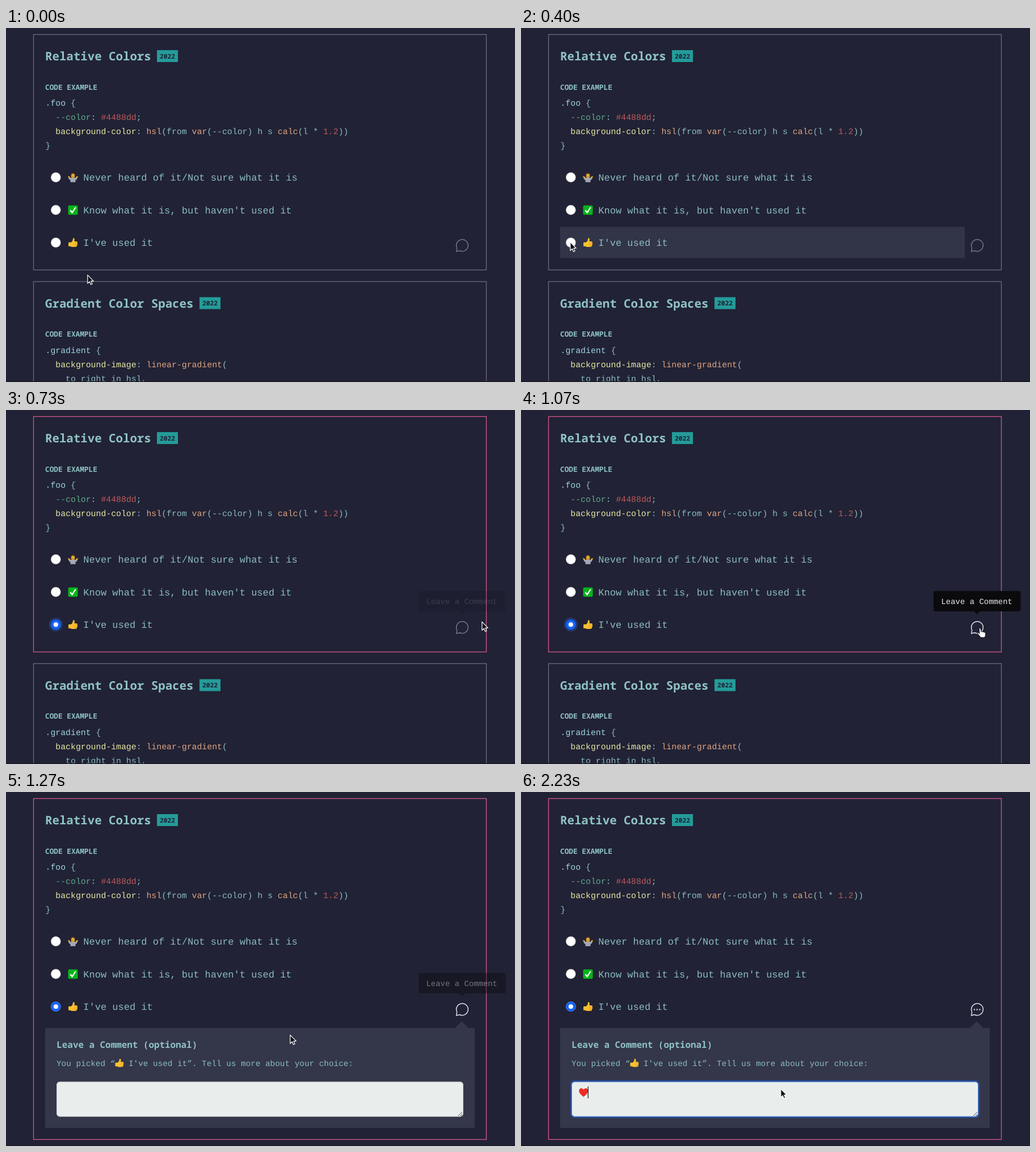
These frames come from a looping animation (897 px wide and 624 px high, 2330 ms). An HTML page:

```html
<!DOCTYPE html>
<html lang="en">
<head>
<meta charset="utf-8">
<title>Survey comment</title>
<style>
  html, body { margin: 0; width: 100%; height: 100%; overflow: hidden; background: #212235; }
  svg { display: block; width: 897px; height: 624px; }
  text { font-family: "Liberation Mono", "Noto Sans Mono", monospace; fill: #8bbcc0; white-space: pre; text-rendering: geometricPrecision; }
  .bold { font-family: "Noto Sans Mono", "Liberation Mono", monospace; font-weight: 600; fill: #8fc3c4; }
  .dark { fill: #1f2134; font-weight: 700; }
  .sel { fill: #9fd3e4; }
  .prop { fill: #e6e8a4; }
  .var { fill: #5fa98a; }
  .num { fill: #bd5a5c; }
  .fn { fill: #e0a580; }
  .card { fill: none; stroke: #6b6c7b; stroke-width: 1.3; }
  .card.on { stroke: #d4578f; }
  .icon { fill: none; stroke: #73758a; stroke-width: 1.5; stroke-linejoin: round; }
  .icon.on { stroke: #dfe2e9; }
</style>
</head>
<body>
<svg id="stage" viewBox="0 0 897 624">
  <defs>
    <g id="shrug">
      <path d="M1 8.5L4 9.6 5.5 9H12.500L14 9.600 17 8.500 15.600 12.500 13.500 13V17H4.500V13L2.400 12.500Z" fill="#a3a9b6"/>
      <path d="M0 6.300L3.500 7.200 4 9.400 1.200 9.800ZM18 6.300L14.500 7.200 14 9.400 16.800 9.800Z" fill="#e9b02f"/>
      <path d="M4.800 8.500V4.500Q5 0.500 9 0.500T13.200 4.500V8.500Z" fill="#5b3d25"/>
      <ellipse cx="9" cy="6" rx="3" ry="3.700" fill="#eab53a"/>
      <path d="M7.200 5.500H8M10 5.500H10.800M7.800 8H10.200" stroke="#6a431f" stroke-width=".8"/>
    </g>
    <g id="check">
      <rect x=".5" y=".5" width="17" height="16.500" rx="2" fill="#08b31b"/>
      <path d="M4.300 9L7.600 13.200 13.700 3.800" fill="none" stroke="#fff" stroke-width="2.200"/>
    </g>
    <g id="thumb">
      <path d="M1 9Q1 8 3 8L6 8Q9 5 9 2 9 0 10.800.8 12.600 2 11.400 6.400L15.600 6.600Q17.400 7 16.600 8.800 17.800 10 16.600 11.200 17.400 12.600 16 13.600 16.400 15.600 14.400 16L9 16.400Q6 16.400 4 15L1 15Z" fill="#fbc02f"/>
      <path d="M11 9H16M11 11.400H16.200M11 13.700H15.800" stroke="#dd951f" stroke-width=".7"/>
    </g>
    <path id="arrow" d="M.8.3V15.300L4.200 12.100 6.500 17.300 9 16.200 6.800 11.100H11.300Z" fill="#111219" stroke="#fff" stroke-width="1.200" stroke-linejoin="round"/>
    <path id="hand" d="M-1.700 1Q-1.700-.5-.3-.5T1.200 1L2 6Q3.600 4.700 4.700 6.200 6.300 5.300 7.200 6.900 9.500 6.300 9.700 8.500 9.900 12.500 8.300 16H1.200Q-1 13-4.200 9.300-4.500 7.300-2.500 7.800L-.7 9.200Z" fill="#fff" stroke="#15161f" stroke-width="1" stroke-linejoin="round"/>
  </defs>
</svg>
<script>
const LOOP = 2330, TICK = 100 / 3;
const stage = document.getElementById("stage");
const $ = id => document.getElementById(id);

const text = (x, y, size, body, cls = "") =>
  `<text x="${x}" y="${y}" font-size="${size}" class="${cls}">${body}</text>`;
const rect = (x, y, w, h, attrs) =>
  `<rect x="${x}" y="${y}" width="${w}" height="${h}" ${attrs}/>`;
const use = (id, x, y, scale = 1) =>
  `<use href="#${id}" transform="translate(${x} ${y}) scale(${scale})"/>`;
// Tokens look like "class|text"; without a class the base colour is used.
const code = (x, y, ...tokens) => text(x, y, 14.84, tokens.map(t => {
  const [cls, s] = t.includes("|") ? t.split("|") : ["", t];
  return `<tspan class="${cls}">${s}</tspan>`;
}).join(""));

const heading = (y, title, badgeX) =>
  text(69, y + 45.5, 20.75, title, "bold") +
  rect(badgeX, y + 27.5, 37, 21, 'fill="#249b99"') +
  text(badgeX + 5, y + 42, 11.2, "2022", "bold dark") +
  text(69, y + 97.2, 12.75, "CODE EXAMPLE", "bold");

const option = (y, emoji, label) =>
  `<circle cx="87.800" cy="${y}" r="8.500" fill="#fff" stroke="#b9bac2" stroke-width=".5"/>` +
  use(emoji, 109, y - 8.5) + text(136.3, y + 6, 17, label);

stage.insertAdjacentHTML("beforeend", `
  ${heading(11.5, "Relative Colors", 266)}
  ${code(69.500, 137, "sel|.foo", " {")}
  ${code(87.300, 162, "var|--color", ": ", "num|#4488dd", ";")}
  ${code(87.300, 187, "prop|background-color", ": ", "fn|hsl", "(from ", "fn|var", "(--color) h s ", "fn|calc", "(l * ", "num|1.2", "))")}
  ${code(69.500, 212, "}")}
  ${rect(69, 350.5, 713, 55, 'id="hover" fill="#323448"')}
  ${option(263.2, "shrug", "Never heard of it/Not sure what it is")}
  ${option(320.7, "check", "Know what it is, but haven't used it")}
  ${option(378.2, "thumb", "I've used it")}
  <g id="picked">
    <circle id="halo" cx="87.800" cy="378.200" r="12" fill="#203b78"/>
    <circle cx="87.800" cy="378.200" r="8.700" fill="#1463fb"/>
    <circle cx="87.800" cy="378.200" r="4" fill="#fff"/>
  </g>
  <g id="next">
    ${rect(48.5, 447, 798, 240, 'class="card"')}
    ${heading(447, "Gradient Color Spaces", 341)}
    ${code(69.500, 572.500, "sel|.gradient", " {")}
    ${code(87.300, 598, "prop|background-image", ": ", "fn|linear-gradient", "(")}
    ${code(105.100, 623, "to right in hsl,")}
  </g>
  ${rect(48.5, 11.5, 798, 415, 'id="card" class="card"')}
  <g id="panel">
    <path d="M69 416H791L803 404 815 416H826V592H69Z" fill="#343649"/>
    ${text(89.300, 451.200, 15.9, "Leave a Comment (optional)", "bold")}
    ${text(89, 483, 14.35, "You picked “")}
    ${use("thumb", 191.5, 469.6, .93)}
    ${text(216, 483, 14.35, "I've used it”. Tell us more about your choice:")}
    <g id="ring">${rect(89.5, 511, 716, 61, 'rx="5" fill="none" stroke="#27488d" stroke-width="6"')}</g>
    ${rect(89.5, 511, 716, 61, 'id="box" rx="5" fill="#e9eeec" stroke="#c4cacb"')}
    <path d="M797 571L804 564M801 571L804 568" stroke="#4a4c55"/>
    <path id="heart" d="M110.300 537.500C106 533.500 102.300 531 102.300 526.500 102.300 521.500 108.500 520.500 110.300 525 112.100 520.500 118.300 521.500 118.300 526.500 118.300 531 114.600 533.500 110.300 537.500Z" fill="#ee2b24"/>
    ${rect(0, 519, 1.2, 21, 'id="caret" fill="#14151d"')}
  </g>
  <g id="bubble" class="icon">
    <path d="M793.600 393.900L794.800 388A10.370 10.370 0 1 1 799.400 392.500Z"/>
    <path id="dots" d="M799 383.500h.01M803.700 383.500h.01M808.400 383.500h.01" stroke-width="2.400" stroke-linecap="round"/>
  </g>
  <g id="tip">
    <path d="M730 319H877.500Q880.500 319 880.500 322V352Q880.500 355 877.500 355H809L803.500 360 798 355H730Q727 355 727 352V322Q727 319 730 319Z" fill="#0b0b0e"/>
    <text x="740.500" y="342" font-size="13.950" style="fill:#e6e7ea">Leave a Comment</text>
  </g>
  ${rect(0, 622.5, 897, 1.5, 'fill="#171827"')}
  <use id="pointer"/>
`);

// Pointer waypoints: tick, x, y. Each hand movement starts fast and settles slowly.
const path = [
  [0, 143, 435], [6, 108, 398], [12, 86, 377], [18, 86, 377],
  [21, 680, 373], [22, 838, 373], [23, 845, 374], [28, 809, 385], [35, 809, 385],
  [38, 500, 428], [41, 463, 495], [46, 457, 523], [70, 457, 523]
];

const slope = (i, axis) =>
  (path[i + 1][axis] - path[i][axis]) / (path[i + 1][0] - path[i][0]);

// Harmonic mean of both sides; the pointer halts where the direction turns.
function tangent(i, axis) {
  if (i === 0 || i === path.length - 1) return 0;
  const a = slope(i - 1, axis), b = slope(i, axis);
  return a * b > 0 ? 2 * a * b / (a + b) : 0;
}

function pointerAt(k) {
  const i = Math.max(1, path.findIndex(p => p[0] >= k)) - 1;
  const span = path[i + 1][0] - path[i][0];
  const u = (k - path[i][0]) / span, v = 1 - u;
  return [1, 2].map(axis =>
    path[i][axis] * v * v * (1 + 2 * u) + path[i + 1][axis] * u * u * (3 - 2 * u) +
    span * u * v * (tangent(i, axis) * v - tangent(i + 1, axis) * u));
}

const ramp = (k, from, to) => Math.min(1, Math.max(0, (k - from) / (to - from)));
const show = (id, on) => $(id).setAttribute("visibility", on ? "inherit" : "hidden");

function draw(k) {
  const [x, y] = pointerAt(k);
  const picked = k >= 13, open = k >= 33, focused = k >= 47, typed = k >= 52;
  const overBubble = x > 791 && x < 816 && y > 372 && y < 397;

  show("hover", x > 69 && x < 782 && y > 350 && y < 405.5);
  show("picked", picked);
  show("halo", !open);
  $("card").classList.toggle("on", picked);
  $("card").setAttribute("height", open ? 601 : 415);
  show("next", !open);
  show("panel", open);
  $("bubble").classList.toggle("on", open || overBubble);
  show("dots", k >= 54);

  $("tip").setAttribute("opacity", ramp(k, 21.2, 27.2) * (1 - ramp(k, 36, 39.4)));

  $("ring").setAttribute("opacity", ramp(k, 46, 48));
  $("box").setAttribute("stroke", focused ? "#6597e6" : "#c4cacb");
  show("heart", typed);
  show("caret", focused && (k < 60 || k >= 67));
  $("caret").setAttribute("x", typed ? 117.7 : 102);

  $("pointer").setAttribute("href", overBubble ? "#hand" : "#arrow");
  $("pointer").setAttribute("transform", `translate(${x} ${y})`);
}

const start = performance.now();
function frame() {
  const t = (performance.now() - start) % LOOP;
  draw(Math.floor((t + 4) / TICK));
  requestAnimationFrame(frame);
}
frame();
</script>
</body>
</html>
```
